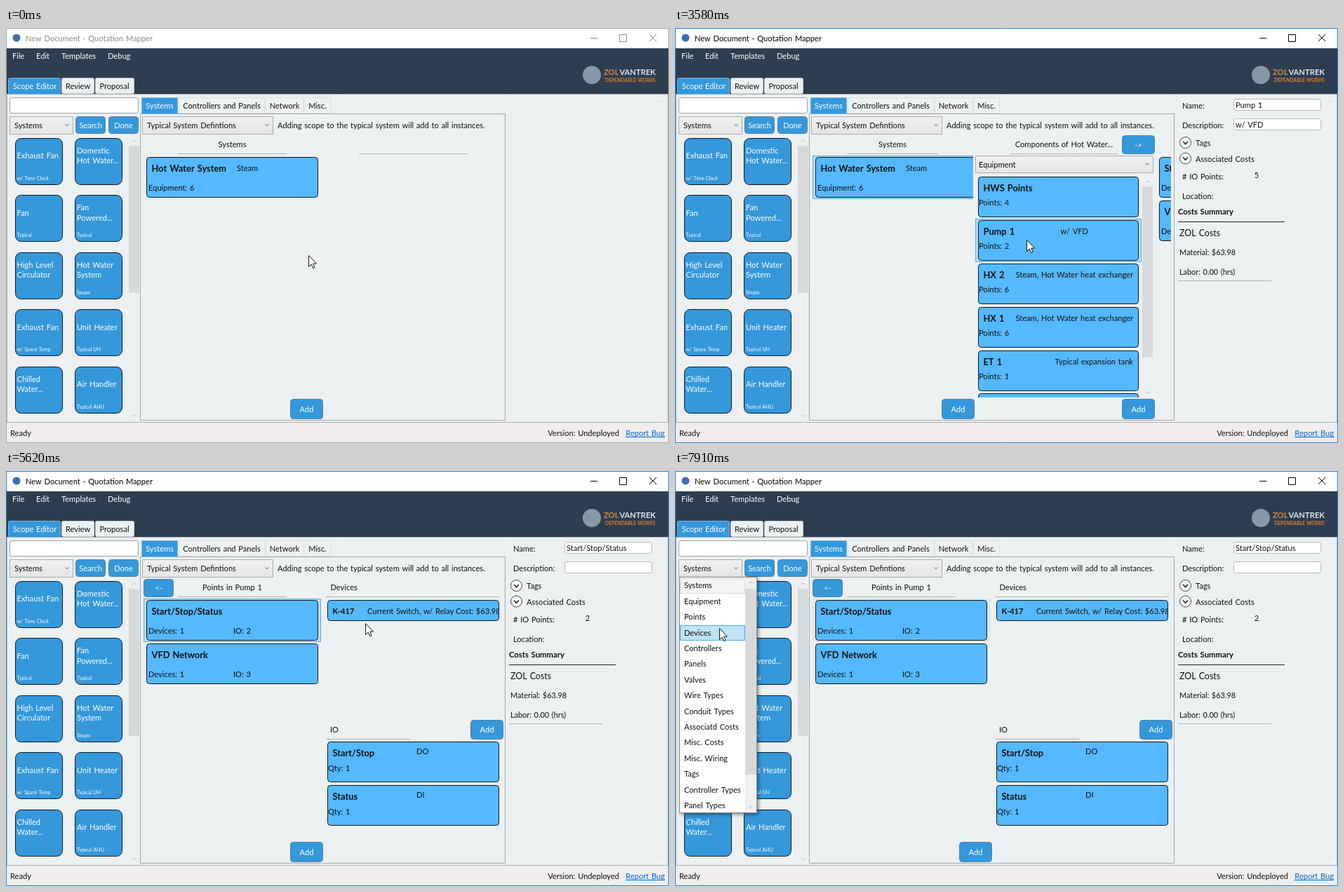
Write an HTML page with a canvas that moves like this. It is 945 by 592 pixels and loops after 8000 ms.

```html
<!DOCTYPE html>
<html lang="en">
<head>
<meta charset="utf-8">
<title>Quotation Mapper</title>
<style>
html, body { margin: 0; width: 100%; height: 100%; overflow: hidden; background: #ecf0f1; }
canvas { display: block; width: 945px; height: 592px; }
</style>
</head>
<body>
<canvas id="stage" width="945" height="592"></canvas>
<script>
const ctx = document.getElementById('stage').getContext('2d');
const LOOP = 8000, SIZE = 11.1, COL = 258, COL_W = 254, LEFT = 196;
const BLUE = '#3498db', CARD = '#55b9ff', PAPER = '#ecf0f1', INK = '#111';
let time = 0, mouse = [0, 0];

// ---- drawing helpers ----
function text(s, x, cy, o = {}) {
  const size = o.size || SIZE;
  ctx.font = `${o.weight || 400} ${size}px Lato, "Open Sans", sans-serif`;
  ctx.wordSpacing = (size * 0.08).toFixed(2) + 'px';
  ctx.textAlign = o.align || 'left';
  ctx.fillStyle = o.color || INK;
  ctx.fillText(s, x, cy + size * 0.355);
}
const bold = (s, x, cy, size = 12.8) => text(s, x, cy, { size, weight: 700 });

function box(x, y, w, h, fill, stroke, r = 0) {
  ctx.beginPath();
  if (stroke) ctx.roundRect(x + .5, y + .5, w - 1, h - 1, r);
  else ctx.roundRect(x, y, w, h, r);
  if (fill) { ctx.fillStyle = fill; ctx.fill(); }
  if (stroke) { ctx.strokeStyle = stroke; ctx.lineWidth = 1; ctx.stroke(); }
}
function line(pts, color, width = 1) {
  ctx.beginPath();
  pts.forEach(([x, y], i) => i ? ctx.lineTo(x, y) : ctx.moveTo(x, y));
  ctx.strokeStyle = color;
  ctx.lineWidth = width;
  ctx.stroke();
}
const rule = (x1, x2, y, color = '#b0b3b5') => line([[x1, y + .5], [x2, y + .5]], color);
const chevron = (x, y, dir = 1, color = '#666', r = 3) =>
  line([[x - r, y - r / 2 * dir], [x, y + r / 2 * dir], [x + r, y - r / 2 * dir]], color);

function clipped(x, y, w, h, draw) {
  ctx.save();
  ctx.beginPath();
  ctx.rect(x, y, w, h);
  ctx.clip();
  draw();
  ctx.restore();
}
function button(label, x, y, w, h) {
  box(x, y, w, h, BLUE, '#5b7f99', 4);
  text(label, x + w / 2, y + h / 2 + .5, { color: '#fff', align: 'center' });
}
const over = (x, y, w, h) =>
  mouse[0] >= x && mouse[0] < x + w && mouse[1] >= y && mouse[1] < y + h;

function combo(label, x, y, w, h, hot) {
  const g = ctx.createLinearGradient(0, y, 0, y + h);
  g.addColorStop(0, hot ? '#ecf4fc' : '#f0f0f0');
  g.addColorStop(1, hot ? '#dcecfc' : '#e5e5e5');
  box(x, y, w, h, g, hot ? '#7eb4ea' : '#acacac');
  text(label, x + (h > 25 ? 7 : 5), y + h / 2 + .5);
  chevron(x + w - 9, y + h / 2 - .5, 1, '#555', 2.5);
}
function scrollbar(x, y, bottom, thumbY, thumbH, w = 15) {
  chevron(x + w / 2, y + 7, -1, '#b4b7b9');
  box(x, thumbY, w, thumbH, '#d7dadb');
  chevron(x + w / 2, bottom - 7, 1, '#b4b7b9');
}
// list entry with its selection or hover frame
function card(x, y, w, h, sel) {
  const frame = [x - 4, y - 2, w + 8, h + 4];
  if (sel === 'on') box(...frame, 'rgba(38,160,218,.24)', '#4db0dd');
  else if (sel === 'off') box(...frame, 'rgba(218,218,218,.24)', '#dcdfe0');
  else if (over(...frame)) box(...frame, 'rgba(38,160,218,.12)', '#7cc4e6');
  box(x, y, w, h, CARD, '#101820', 4);
}

// ---- timeline ----
// progress in n equal steps, the first at a and the last at b
function steps(a, b, n) {
  if (time < a) return 0;
  return Math.min(1, (Math.floor((time - a) / (b - a) * (n - 1) + 1e-6) + 1) / n);
}
const ease = p => p * p * (3 - 2 * p);
const bend = (a, c, b, p) =>
  a.map((v, i) => (1 - p) ** 2 * v + 2 * p * (1 - p) * c[i] + p * p * b[i]);

const moves = [
  { at: [320, 780, 7], from: [431, 324], via: [385, 265], to: [328, 225] },
  { at: [930, 931, 1], from: [328, 225], via: [328, 225], to: [329, 226] },
  { at: [2340, 2790, 7], from: [329, 226], via: [460, 235], to: [501, 301] },
  { at: [2940, 2941, 1], from: [501, 301], via: [501, 301], to: [501, 302] },
  { at: [4350, 4720, 5], from: [501, 302], via: [512, 270], to: [512, 217] },
  { at: [6050, 6750, 10], from: [512, 217], via: [270, 165], to: [69, 143] },
  { at: [7300, 7910, 9], from: [69, 143], via: [78, 190], to: [63, 224] }
];
function pointer() {
  let m = moves[0];
  for (const k of moves) if (time >= k.at[0]) m = k;
  return bend(m.from, m.via, m.to, ease(steps(...m.at)));
}
const stepped = keys => keys.reduce((v, [at, to]) => time >= at ? to : v, 0);
const scroll = () =>
  stepped([[3570, .1], [3650, .6], [3730, 1]]) +
  stepped([[5400, .105], [5540, .6], [5620, 1]]);

// ---- fixed window parts ----
const tiles = [
  ['Exhaust Fan', '', 'w/ Time Clock'], ['Domestic', 'Hot Water...', ''],
  ['Fan', '', 'Typical'], ['Fan', 'Powered...', 'Typical'],
  ['High Level', 'Circulator', ''], ['Hot Water', 'System', 'Steam'],
  ['Exhaust Fan', '', 'w/ Space Temp'], ['Unit Heater', '', 'Typical UH'],
  ['Chilled', 'Water...', ''], ['Air Handler', '', 'Typical AHU']
];
function titleBar(active) {
  box(0, 0, 945, 30, '#fff');
  ctx.beginPath();
  ctx.arc(15, 14, 5.5, 0, 7);
  ctx.fillStyle = '#3c6eb0';
  ctx.fill();
  const color = active ? '#000' : '#8a8a8a';
  text('New Document - Quotation Mapper', 28, 15, { color });
  line([[833, 14.5], [843, 14.5]], color);
  box(874, 9, 11, 11, null, color);
  line([[917, 9], [927, 19]], color);
  line([[927, 9], [917, 19]], color);
}
function header() {
  box(0, 29, 945, 65, '#2c3e50');
  [['File', 9], ['Edit', 43], ['Templates', 79], ['Debug', 145]]
    .forEach(([s, x]) => text(s, x, 40.5, { color: '#fff' }));
  box(3, 71, 75, 24, BLUE, '#7fb9e0', 2);
  text('Scope Editor', 41, 83, { color: '#fff', align: 'center' });
  box(79, 71, 47, 23, PAPER, '#c8ccd0', 2);
  text('Review', 102.5, 83, { align: 'center' });
  box(127, 71, 56, 23, PAPER, '#c8ccd0', 2);
  text('Proposal', 154.5, 83, { align: 'center' });
  ctx.beginPath();
  ctx.arc(835, 67, 13, 0, 7);
  ctx.fillStyle = '#8798a6';
  ctx.fill();
  text('ZOL', 852, 63, { size: 11.2, weight: 700, color: '#d9843b' });
  text('VANTREK', 926, 63, { size: 11.2, weight: 700, color: '#dfe5ea', align: 'right' });
  text('DEPENDABLE WORKS', 854, 74.5, { size: 6.8, weight: 700, color: '#e07b28' });
}
function palette() {
  box(5, 99, 184, 23, '#fff', '#9aa0a4', 3);
  combo('Systems', 5, 126, 91, 26, over(5, 126, 91, 25));
  button('Search', 99, 126, 43, 25);
  button('Done', 146, 126, 43, 25);
  tiles.forEach(([a, b, note], i) => {
    const x = 13 + i % 2 * 85.5, y = 157 + Math.floor(i / 2) * 81.4;
    box(Math.round(x - .1), Math.round(y), 68, 67, BLUE, '#0c1a26', 8);
    const white = { color: '#fff' };
    text(a, x + 2.5, y + (b ? 18 : 25.5), white);
    text(b, x + 2.5, y + 32.5, white);
    text(note, x + 2.5, y + 57.5, { size: 7, color: '#fff' });
  });
  scrollbar(175, 154, 560, 168, 210);
}
function workspace() {
  box(191, 122, 521, 438, PAPER, '#a3a7aa');
  [['Controllers and Panels', 246, 123], ['Network', 370, 54], ['Misc.', 425, 38]]
    .forEach(([s, x, w]) => {
      box(x, 99, w, 23, '#eef1f2', '#dcdfe1');
      text(s, x + w / 2, 111, { align: 'center' });
    });
  box(193, 99, 52, 24, BLUE, '#7fb9e0');
  text('Systems', 219, 111, { color: '#fff', align: 'center' });
  combo('Typical System Defintions', 194, 126, 187, 26);
  text('Adding scope to the typical system will add to all instances.', 387, 139);
}
function statusBar() {
  box(0, 563, 945, 29, '#f1eded');
  rule(0, 945, 562, '#a9adb0');
  text('Ready', 6, 578);
  text('Version: Undeployed', 874, 578, { align: 'right' });
  text('Report Bug', 939, 578, { align: 'right', color: '#0066cc' });
  rule(883, 939, 583, '#0066cc');
}

// ---- columns of the workspace ----
function heading(label, x, w) {
  if (w < 110) return;
  rule(x + 49, x + w - 50, 179);
  text(label, x + w / 2 - .5, 166.5, { align: 'center' });
}
const addButton = (x, w) => button('Add', x + w - 45, 529, 47, 29);

function systems(x, w) {
  heading('Systems', x, w);
  clipped(x - 1, 181, w + 1, 346, () => {
    card(x + 4, 184, 245, 58, time >= 1100 && 'on');
    bold('Hot Water System', x + 11.5, 200.5);
    text('Steam', x + 133, 200);
    text('Equipment: 6', x + 7, 228);
  });
  addButton(x, w);
}
const parts = [
  ['HWS Points', 4, '', 0], ['Pump 1', 2, 'w/ VFD', 161],
  ['HX 2', 6, 'Steam, Hot Water heat exchanger', 225],
  ['HX 1', 6, 'Steam, Hot Water heat exchanger', 225],
  ['ET 1', 1, 'Typical expansion tank', 225], ['', '', '', 0]
];
function components(x, w) {
  const tight = w < COL_W, bottom = tight ? 511 : 527, squeeze = tight ? 5 : 0;
  heading(tight ? 'Components of Hot...' : 'Components of Hot Water...', x, w);
  if (w > 30) combo('Equipment', x, 182, w, 25);
  clipped(x - 1, 209, Math.max(0, w - 15), bottom - 209, () => {
    parts.forEach(([name, n, note, right], i) => {
      const y = Math.round(212.3 + i * 61.8);
      const sel = i === 1 && time >= 3490 && (time < 5280 ? 'on' : 'off');
      card(x + 4, y, 229, 58, sel);
      bold(name, x + 11.5, y + 16);
      if (name) text('Points: ' + n, x + 5, y + 37.5);
      text(note, x + right - squeeze, y + 16, { align: 'right' });
    });
  });
  if (w > 30) scrollbar(x + w - 16, 212, bottom, 226, tight ? 219 : 244);
  if (tight && w > 70) {
    box(x + 15, 513, w - 62, 14, '#d7dadb');
    line([[x + 9, 517], [x + 6, 520], [x + 9, 523]], '#b4b7b9');
    line([[x + w - 26, 517], [x + w - 23, 520], [x + w - 26, 523]], '#b4b7b9');
  }
  addButton(x, w);
}
function points(x, w) {
  heading('Points in Pump 1', x, w);
  clipped(x - 1, 181, w + 1, 346, () => {
    [['Start/Stop/Status', 2], ['VFD Network', 3]].forEach(([name, io], i) => {
      const y = 184 + i * 62;
      const sel = !i && time >= 5280 && (time < 6920 ? 'on' : 'off');
      card(x + 4, y, 245, 58, sel);
      bold(name, x + 11.5, y + 16.5);
      text('Devices: 1', x + 7, y + 44);
      text('IO: ' + io, x + 128, y + 44);
    });
  });
  addButton(x, w);
}
function devices(x) {
  const room = 709 - x, wide = room > 80;
  text(wide ? 'Devices' : '..', x + 8.5, 166.5);
  if (wide) {
    rule(x + 2, x + 250, 179);
    text('IO', x + 8, 369);
    rule(x + 2, x + 122, 382);
  }
  card(x + 4, 184, 245, 30);
  clipped(x + 4, 184, 245, 30, () => {
    bold('K-417', x + 11.5, 200, 11.2);
    text('Current Switch, w/ Relay', x + 61, 200);
    text('Cost: $63.98', x + 187, 200);
  });
  button('Add', x + Math.max(11, room - 47), 355, 47, 28);
  [['Start/Stop', 'DO'], ['Status', 'DI']].forEach(([name, kind], i) => {
    const y = 386 + i * 62;
    card(x + 4, y, 245, 58);
    bold(name, x + 11.5, y + 16.5);
    text(kind, x + 131, y + 14);
    text('Qty: 1', x + 5, y + 38);
  });
}
const columns = [systems, components, points, devices];

function columnView() {
  const pos = scroll(), base = Math.floor(pos), s = pos - base;
  const w = Math.round(COL_W * (1 - s)), mid = LEFT + Math.round(COL * (1 - s));
  clipped(194, 152, w + 5, 407, () => columns[base](LEFT, w));
  clipped(mid - 1, 152, 711 - mid, 407, () => {
    if (time < 1190) rule(503, 658, 179);
    else columns[base + 1](mid, COL_W);
    if (s) button('->', mid + 209, 153, 47, 27);
  });
  if (s) {
    const x = mid + COL;
    clipped(x - 1, 152, Math.max(0, 708 - x), 407, () => columns[base + 2](x, COL_W));
  }
  if (base) button('<-', 196, 154, 43, 26);
}

// ---- properties ----
function properties() {
  const pump = time >= 3490, point = time >= 5280;
  const name = point ? 'Start/Stop/Status' : pump ? 'Pump 1' : 'Hot Water System';
  const note = point ? '' : pump ? 'w/ VFD' : 'Steam';
  [['Name:', 111, name], ['Description:', 139, note]].forEach(([label, y, value]) => {
    text(label, 723, y);
    box(796, y - 10, 125, 17, '#fff', '#b3b8bc', 3);
    text(value, 799, y - 1);
  });
  [['Tags', 164], ['Associated Costs', 186.5]].forEach(([label, y]) => {
    ctx.beginPath();
    ctx.arc(727.5, y - .5, 8, 0, 7);
    ctx.fillStyle = '#f7f9f9';
    ctx.fill();
    ctx.strokeStyle = '#444';
    ctx.lineWidth = 1;
    ctx.stroke();
    line([[724, y - 2], [727.5, y + 1.5], [731, y - 2]], '#222', 1.6);
    text(label, 742, y + .5);
  });
  text('# IO Points:', 723, 212);
  text(point ? '2' : pump ? '5' : '0', 829, 210.5, { align: 'center' });
  text('Location:', 723, 240.5);
  bold('Costs Summary', 717, 262, 11.3);
  rule(717, 869, 276, '#222');
  if (!pump) return;
  text('ZOL Costs', 719, 292.5, { size: 12.4 });
  text('Material: $63.98', 719, 320, { size: 10.9 });
  text('Labor: 0.00 (hrs)', 719, 348, { size: 10.9 });
  rule(717, 850, 360);
}

// ---- drop-down list ----
const options = ['Systems', 'Equipment', 'Points', 'Devices', 'Controllers', 'Panels',
  'Valves', 'Wire Types', 'Conduit Types', 'Associatd Costs', 'Misc. Costs',
  'Misc. Wiring', 'Tags', 'Controller Types', 'Panel Types'];
function dropDown() {
  const open = steps(6920, 7070, 3);
  if (!open) return;
  const h = Math.round(337 * open);
  ctx.save();
  ctx.shadowColor = 'rgba(0,0,0,.45)';
  ctx.shadowBlur = 5;
  ctx.shadowOffsetX = ctx.shadowOffsetY = 2;
  box(6, 151, 111, h, '#fff');
  ctx.restore();
  clipped(6, 151, 111, h, () => {
    options.forEach((label, i) => {
      const y = 152.5 + i * 22.4, row = [7, Math.round(y), 93, 22];
      if (over(...row)) box(...row, '#bee3f4', '#4fb1de');
      else if (!i) box(...row, '#f4f4f4', '#dadada');
      text(label, 13, y + 11);
    });
    box(100, 152, 16, 335, '#f0f0f0');
    scrollbar(100, 152, 486, 168, 265, 16);
  });
  box(6, 151, 111, h, null, '#8c8f91');
}

function cursor() {
  const shape = [[0, 0], [0, 16], [3.7, 12.6], [6.3, 18.2], [8.6, 17.2], [6.2, 11.6], [11, 11.6]];
  ctx.save();
  ctx.translate(Math.round(mouse[0]) + .5, Math.round(mouse[1]) + .5);
  ctx.beginPath();
  shape.forEach(p => ctx.lineTo(...p));
  ctx.closePath();
  ctx.fillStyle = '#fff';
  ctx.fill();
  ctx.strokeStyle = '#111';
  ctx.lineWidth = 1;
  ctx.stroke();
  ctx.restore();
}

function draw(now) {
  time = now % LOOP;
  mouse = pointer();
  const active = time >= 1100;
  box(0, 0, 945, 592, PAPER);
  box(1, 94, 943, 469, PAPER, '#b4b8ba');
  box(712, 95, 3, 467, '#f0f0f0');
  titleBar(active);
  header();
  palette();
  workspace();
  columnView();
  chevron(934, 104, -1, '#d3d7d9');
  chevron(934, 553, 1, '#d3d7d9');
  if (active) properties();
  statusBar();
  box(0, 0, 945, 592, null, active ? '#1883d7' : '#a5a5a5');
  dropDown();
  cursor();
  requestAnimationFrame(draw);
}
requestAnimationFrame(draw);
</script>
</body>
</html>
```
